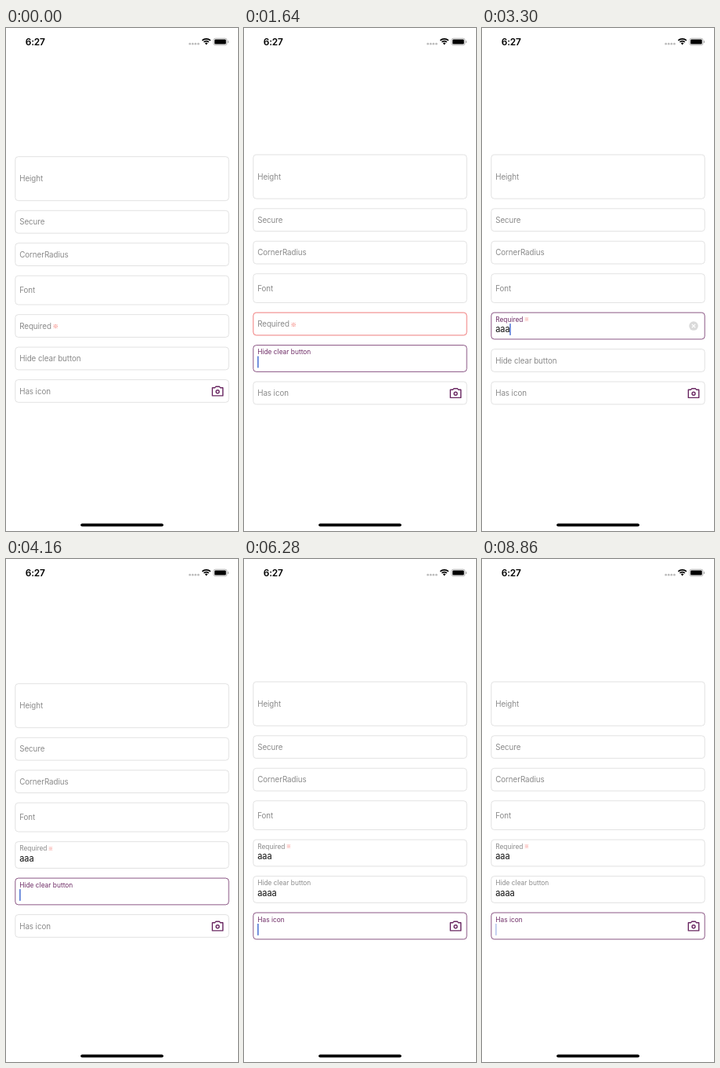
Animation of 296 by 640 pixels, one loop 8940 ms. Source, as an HTML page with a canvas:

```html
<!DOCTYPE html>
<html lang="en">
<head>
<meta charset="utf-8">
<title>Text fields</title>
<style>
html, body { margin: 0; width: 100%; height: 100%; overflow: hidden; background: #fff; }
canvas { display: block; width: 296px; height: 640px; }
</style>
</head>
<body>
<canvas id="stage"></canvas>
<script>
const W = 296, H = 640, LOOP = 8940;
const canvas = document.getElementById('stage');
const ctx = canvas.getContext('2d');
const dpr = window.devicePixelRatio || 1;
canvas.width = W * dpr;
canvas.height = H * dpr;

const FONT = 'Inter, "Open Sans", sans-serif';
const MARK_FONT = '"Noto Sans CJK JP", "Noto Sans CJK", sans-serif';
const GREY = [138, 138, 138], PURPLE = [110, 44, 102], LINE = [219, 219, 219], RED = [236, 92, 92];
const ICON = '#6a2862';
const LEFT = 11.84, RIGHT = 284.16, TEXT_X = 17.2, GAP = 11.84, GROW = 5, CHAR = 6.1;

const fields = [
  { label: 'Height', h: 56.8 },
  { label: 'Secure', h: 29.6 },
  { label: 'CornerRadius', h: 29.6 },
  { label: 'Font', h: 37.6 },
  { label: 'Required', h: 29.6, required: true, clearX: 270, keys: [2920, 3120, 3300] },
  { label: 'Hide clear button', h: 29.6, keys: [4550, 4730, 4910, 5100] },
  { label: 'Has icon', h: 29.6, camera: true, clearX: 241.3, keys: [6550, 6720, 6890, 7080], cleared: 8240 }
];

// Focus changes: time, field, times and progress of the steps
const QUICK = [[0, .5], [110, 1]];
const SLOW = [[0, .3], [115, .8], [230, 1]];
const focusMoves = [[700, 4, QUICK], [1530, 5, QUICK], [2390, 4, SLOW], [3930, 5, SLOW], [5720, 6, QUICK]];
const caretLevels = [[0, 1], [1330, .42], [1530, 1], [2150, .42], [2390, 1], [6400, .42], [6550, 1],
  [7700, .42], [7940, .7], [8060, 1], [8860, .42]];

const mix = (a, b, p) => a + (b - a) * p;
const mixRgb = (a, b, p) => `rgb(${a.map((v, i) => Math.round(mix(v, b[i], p)))})`;
const stepAt = (steps, t) => steps.reduce((v, [at, value]) => t >= at ? value : v, 0);

function typed(f, t) {
  if (!f.keys || t >= f.cleared) return 0;
  return f.keys.filter(k => t >= k).length;
}

function stateAt(t) {
  const s = fields.map(f => ({ count: typed(f, t), focus: 0, open: 0, error: 0 }));
  let last = -1;
  for (const [at, i, steps] of focusMoves) {
    if (t < at) break;
    const p = stepAt(steps, t - at);
    if (last >= 0) {
      const old = s[last];
      old.focus = 1 - p;
      if (!old.count) {
        old.open = 1 - p;
        if (fields[last].required) old.error = 1;
      }
    }
    s[i].focus = p;
    s[i].open = Math.max(s[i].open, p);
    last = i;
  }
  return s;
}

function box(x, y, w, h, r) {
  ctx.beginPath();
  ctx.roundRect(x, y, w, h, r);
}

function disc(x, y, r) {
  ctx.beginPath();
  ctx.arc(x, y, r, 0, Math.PI * 2);
}

function text(str, x, y, font, color, spacing = 0) {
  ctx.font = font;
  ctx.letterSpacing = spacing + 'px';
  ctx.fillStyle = color;
  ctx.fillText(str, x, y);
  return ctx.measureText(str).width;
}

function statusBar() {
  text('6:27', 24.8, 21.9, '600 11.9px ' + FONT, '#000', -.2);
  ctx.fillStyle = '#bcbcbc';
  for (let i = 0; i < 4; i++) {
    disc(234.6 + i * 3.6, 20.2, 1.35);
    ctx.fill();
  }
  // Wi-Fi
  ctx.strokeStyle = ctx.fillStyle = '#000';
  ctx.lineWidth = 1.7;
  for (const r of [4.5, 7.4]) {
    ctx.beginPath();
    ctx.arc(255.6, 21.2, r, -Math.PI * .75, -Math.PI * .25);
    ctx.stroke();
  }
  ctx.beginPath();
  ctx.moveTo(255.6, 21.5);
  ctx.arc(255.6, 21.2, 2.6, -Math.PI * .75, -Math.PI * .25);
  ctx.fill();
  // Battery
  ctx.strokeStyle = '#a8a8a8';
  ctx.lineWidth = .8;
  box(264.7, 13.2, 17.3, 8.6, 2.4);
  ctx.stroke();
  box(266, 14.5, 14.7, 6, 1.3);
  ctx.fill();
  ctx.fillStyle = '#a8a8a8';
  box(282.9, 16.1, 1.1, 3, .6);
  ctx.fill();
}

function homeBar() {
  ctx.fillStyle = '#000';
  box(95.2, 630.4, 105.6, 3.9, 1.95);
  ctx.fill();
}

function camera(x, y) {
  ctx.strokeStyle = ICON;
  ctx.lineWidth = 1.4;
  ctx.lineJoin = 'round';
  ctx.beginPath();
  [[-6.7, -4.1], [-3.6, -4.1], [-2.4, -5.6], [2.4, -5.6], [3.6, -4.1], [6.7, -4.1], [6.7, 6], [-6.7, 6]]
    .forEach(([dx, dy]) => ctx.lineTo(x + dx, y + dy));
  ctx.closePath();
  ctx.stroke();
  disc(x, y + .8, 2);
  ctx.stroke();
}

function clearButton(x, y) {
  ctx.fillStyle = '#dadada';
  disc(x, y, 5.8);
  ctx.fill();
  ctx.strokeStyle = '#fff';
  ctx.lineWidth = 1.1;
  ctx.beginPath();
  for (const d of [-2.2, 2.2]) {
    ctx.moveTo(x - 2.2, y - d);
    ctx.lineTo(x + 2.2, y + d);
  }
  ctx.stroke();
}

function drawField(f, s, y, h, caret) {
  const mid = y + h / 2;
  ctx.strokeStyle = mixRgb(s.error ? RED : LINE, PURPLE, s.focus);
  ctx.lineWidth = .8;
  box(LEFT, y + .4, RIGHT - LEFT, h - .8, 3.9);
  ctx.stroke();

  const base = mix(y + f.h / 2 + 3.6, y + 11.9, s.open);
  const size = mix(9.8, 8.4, s.open);
  const width = text(f.label, TEXT_X, base, size + 'px ' + FONT,
    mixRgb(GREY, PURPLE, s.focus), mix(-.08, 0, s.open));
  if (f.required) {
    const m = mix(7.4, 6.4, s.open);
    text('※', TEXT_X + width + mix(1.7, 1.3, s.open), base - size * .33 + m * .38,
      m + 'px ' + MARK_FONT, '#f0594f');
  }

  if (s.count) text('a'.repeat(s.count), TEXT_X, y + 25.6, '11px ' + FONT, '#111', CHAR - 6.17);
  if (s.focus) {
    ctx.globalAlpha = caret * s.focus;
    ctx.fillStyle = '#3b64d0';
    ctx.fillRect(TEXT_X + s.count * CHAR - (s.count ? .2 : 0), y + 14.4, 1.4, 14.8);
    ctx.globalAlpha = s.focus;
    if (f.clearX && s.count) clearButton(f.clearX, mid);
    ctx.globalAlpha = 1;
  }
  if (f.camera) camera(270, mid);
}

function draw(t) {
  ctx.setTransform(dpr, 0, 0, dpr, 0, 0);
  ctx.fillStyle = '#fff';
  ctx.fillRect(0, 0, W, H);
  statusBar();

  const states = stateAt(t);
  const caret = stepAt(caretLevels, t);
  const heights = fields.map((f, i) => f.h + GROW * states[i].open);
  const total = heights.reduce((a, b) => a + b, GAP * (fields.length - 1));
  let y = (H - total) / 2;
  fields.forEach((f, i) => {
    drawField(f, states[i], y, heights[i], caret);
    y += heights[i] + GAP;
  });
  homeBar();
}

const start = performance.now();
function tick() {
  draw((performance.now() - start) % LOOP);
  requestAnimationFrame(tick);
}
tick();
</script>
</body>
</html>
```
